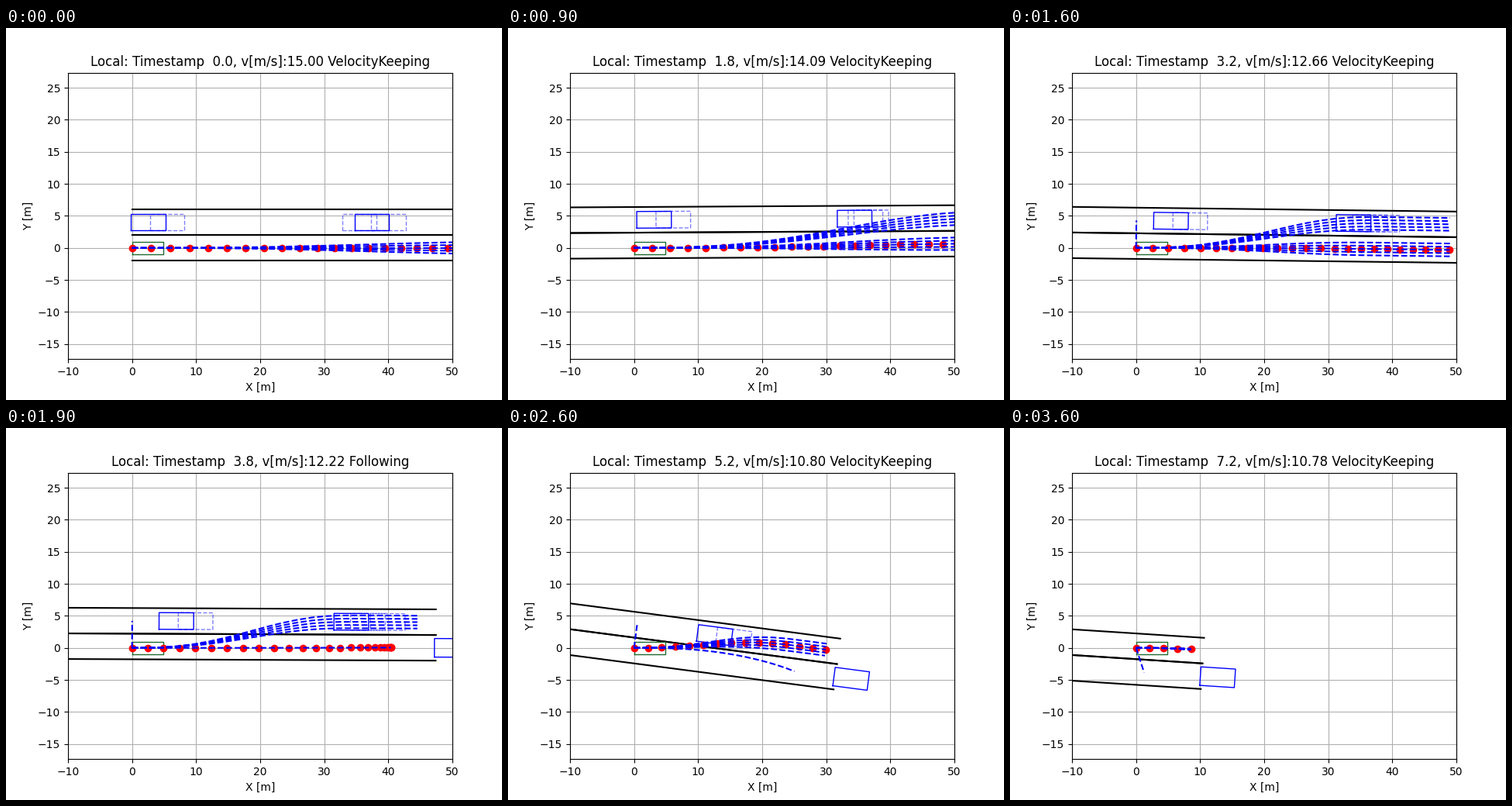
Recreate the animation shown at these times as a matplotlib script. Size 640 by 480 pixels, loop 3.7 s.

```python
import numpy as np
import matplotlib.pyplot as plt
from matplotlib.animation import FuncAnimation

FRAMES, INTERVAL, DT = 37, 100, 0.2
ROAD_END = 100.0
LANES = (0.0, 4.0)

# Ego key states: time, x, y, heading, speed
KEYS = np.array([
    (0.0, 0.00, 0.00, 0.0000, 15.00),
    (1.0, 14.85, -0.25, -0.0150, 14.58),
    (2.4, 34.60, -0.37, 0.0090, 13.36),
    (3.2, 45.10, -0.28, 0.0122, 12.66),
    (4.4, 59.60, -0.20, 0.0028, 10.96),
    (6.0, 76.70, 1.91, 0.2187, 10.58),
    (7.2, 89.50, 3.75, 0.0643, 10.78),
])

fig, ax = plt.subplots(figsize=(6.4, 4.8), dpi=100)


def ego_state(t):
    """Position and velocity from cubic Hermite pieces."""
    k = int(np.clip(np.searchsorted(KEYS[:, 0], t) - 1, 0, len(KEYS) - 2))
    a, b = KEYS[k], KEYS[k + 1]
    h = b[0] - a[0]
    s = (t - a[0]) / h
    va, vb = (q[4] * np.array([np.cos(q[3]), np.sin(q[3])]) for q in (a, b))
    step = b[1:3] - a[1:3]
    pos = (a[1:3] + step * s * s * (3 - 2 * s)
           + h * va * s * (1 - s) ** 2 - h * vb * s * s * (1 - s))
    vel = (step / h * 6 * s * (1 - s)
           + va * (1 - s) * (1 - 3 * s) + vb * s * (3 * s - 2))
    return pos, vel


def quintic(t, p0, v0, p1, T):
    """Move from p0 with speed v0 to rest at p1 after T seconds."""
    s = np.clip(t / T, 0, 1)
    blend = s**3 * (10 - 15 * s + 6 * s * s)
    return p0 + (p1 - p0) * blend + v0 * T * (s - 6 * s**3 + 8 * s**4 - 3 * s**5)


def keep_speed(t, pos, vel, target):
    """Velocity keeping path that settles on a lateral target."""
    horizon = 4.4
    tt = np.arange(0, horizon + 0.01, DT)
    s = tt / horizon
    goal = np.interp(t, [0, 1, 2.4, 3.2, 4.4, 6], [11.7, 10.7, 10.8, 9.6, 10, 10.7])
    T = np.interp(t, [0, 1, 2.4, 3.2, 4.4, 6], [5, 5.1, 4.4, 3.3, 2.8, 2])
    x = pos[0] + vel[0] * tt + (goal - vel[0]) * horizon * (s**3 - s**4 / 2)
    y = quintic(tt, pos[1], vel[1], target, T)
    ok = x <= ROAD_END - 1.4
    return x[ok], y[ok]


def follow(t, pos, vel):
    """Stop behind the parked car in the right lane."""
    T = np.interp(t, [4.4, 6, 7.2], [5, 3, 2])
    stop = np.interp(t, [4.4, 6, 7.2], [93, 94.1, 91])
    tt = np.linspace(0, T, 26)
    v = vel if stop - pos[0] > 5 else (0, 0)
    return quintic(tt, pos[0], v[0], stop, T), quintic(tt, pos[1], v[1], 0, T)


def draw(i):
    t = i * DT
    pos, vel = ego_state(t)
    head = np.arctan2(vel[1], vel[0])
    c, s = np.cos(head), np.sin(head)

    def local(x, y):
        dx, dy = np.asarray(x) - pos[0], np.asarray(y) - pos[1]
        return c * dx + s * dy, c * dy - s * dx

    def car(x, y, half, **style):
        if x <= ROAD_END:
            xs = x - 0.2 + 5.4 * np.array([0, 1, 1, 0, 0])
            ys = y + half * np.array([-1, -1, 1, 1, -1])
            ax.plot(*local(xs, ys), color="b", lw=1, **style)

    ax.clear()

    for mid in LANES:
        for side in (-2, 2):
            ax.plot(*local([0, ROAD_END], [mid + side] * 2), "k", lw=1.5)

    ax.plot([0, 4.9, 4.9, 0, 0], [-0.95, -0.95, 0.95, 0.95, -0.95],
            color="#206a30", lw=1)

    ghost = dict(ls="--", alpha=0.5)
    for x0, v, leads in ((0, 15, (0.2, 2.2)), (34.9, 13, (0.2,))):
        car(x0 + v * t, 4, 1.3)
        for lead in leads:
            car(x0 + v * (t + lead), 4, 1.3, **ghost)
    car(ROAD_END, 0, 1.45)

    following = 3.7 < t < 4.7
    spread = np.interp(t, [5, 6, 7.2], [0.5, 0.35, 0.15]) * np.arange(-2, 3)
    paths = []
    if t < 3.7:
        paths += [keep_speed(t, pos, vel, d) for d in spread]
    else:
        paths.append(follow(t, pos, vel))
    if t > 1.3:
        paths += [keep_speed(t, pos, vel, 4 + d) for d in spread]
    elif t > 0.5:
        paths.append(keep_speed(t, pos, vel, 4))
    if 2.7 < t < 6.5:
        paths.append(([pos[0]] * 2, [pos[1], 4]))

    if following:
        best = follow(t, pos, vel)
    else:
        best = keep_speed(t, pos, vel, 0 if t < 4.7 else 4)
    ax.plot(*local(*best), "ro")
    for path in paths:
        ax.plot(*local(*path), "b--", lw=1.5)

    mode = "Following" if following else "VelocityKeeping"
    ax.set_title(f"Local: Timestamp {t:4.1f}, v[m/s]:{np.hypot(*vel):.2f} {mode}")
    ax.set_xlabel("X [m]")
    ax.set_ylabel("Y [m]")
    ax.set_xlim(-10, 50)
    ax.set_ylim(-17.355, 27.355)
    ax.grid(True)
    return ax.lines


anim = FuncAnimation(fig, draw, frames=FRAMES, interval=INTERVAL,
                     init_func=lambda: draw(0), repeat=True, repeat_delay=0)
plt.show()
```
